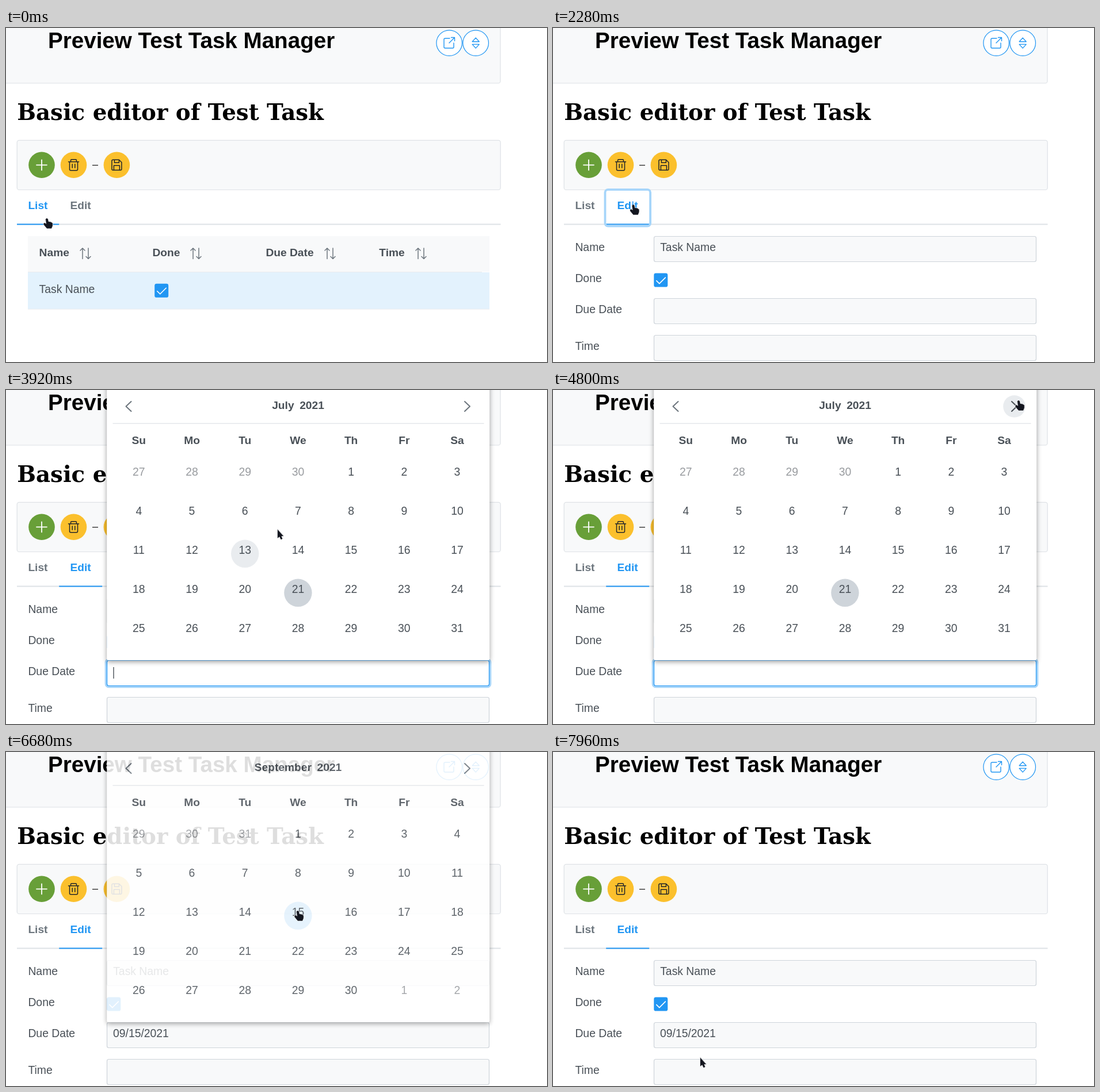
Write an HTML page with a canvas that moves like this. It is 940 px wide and 581 px high and loops after 8 s.

```html
<!DOCTYPE html>
<html lang="en">
<head>
<meta charset="utf-8">
<title>Task editor</title>
<style>
html, body { margin: 0; width: 100%; height: 100%; overflow: hidden; background: #fff; }
canvas { display: block; }
</style>
</head>
<body>
<canvas id="stage" width="940" height="581"></canvas>
<script>
const W = 940, H = 581, LOOP = 8000, TICK = 40;
const stage = document.getElementById('stage').getContext('2d');
const layerCanvas = document.createElement('canvas');
layerCanvas.width = W;
layerCanvas.height = H;
const layer = layerCanvas.getContext('2d');
let c = stage;

const BLUE = '#2196f3', TEXT = '#495057', MUTED = '#6c757d', PANEL = '#f8f9fa',
  LINE = '#dee2e6', BORDER = '#ced4da', HOVER = '#e9ecef', GLOW = '#a6d5fa', INK = '#212529';
const SANS = '"Liberation Sans", Arial, sans-serif';
const BODY = '19.35px ' + SANS, BOLD = 'bold 19.2px ' + SANS;

// Moments of the user's actions, in ms
const OPEN_TAB = 1640, FOCUS = 3320, POPUP = 3360, CARET_OFF = 4640,
  NEXT1 = 5320, NEXT2 = 5480, PICK = 6640, CLOSED = 6920;

const PATH = [
  [720, 71, 331], [1040, 139, 306],
  [2240, 139, 306], [3080, 223, 485],
  [3800, 223, 485], [3920, 472, 243],
  [4160, 473, 243], [4320, 772, 33],
  [4440, 772, 33], [4800, 809, 18],
  [5560, 809, 18], [5720, 690, 78], [5920, 559, 168],
  [6040, 559, 168], [6280, 507, 276],
  [7200, 507, 276], [7960, 256, 532]
];
const FIELDS = [362.5, 470.5, 534.5];
const FIELD_X = 175.5, FIELD_W = 664, FIELD_H = 44;
const NEXT = [801.5, 28.5];
const MONTHS = { 6: 'July', 7: 'August', 8: 'September' };

const clamp = v => Math.max(0, Math.min(1, v));
const ramp = (t, from, len) => clamp((t - from) / len);
const dayX = i => 230.8 + 92.2 * (i % 7);
const dayY = i => 149 + 68 * Math.floor(i / 7);

function text(s, x, y, color = TEXT, font = BODY, align = 'left') {
  c.font = font;
  c.fillStyle = color;
  c.textAlign = align;
  c.fillText(s, x, y);
}

function box(x, y, w, h, r, fill, stroke, lw = 1.2) {
  c.beginPath();
  c.roundRect(x, y, w, h, r);
  paint(fill, stroke, lw);
}

function disc(x, y, r, fill, stroke, lw = 1.2) {
  c.beginPath();
  c.arc(x, y, r, 0, 7);
  paint(fill, stroke, lw);
}

function paint(fill, stroke, lw) {
  if (fill) { c.fillStyle = fill; c.fill(); }
  if (stroke) { c.strokeStyle = stroke; c.lineWidth = lw; c.stroke(); }
}

function icon(d, x, y, stroke, lw = 1.6, fill) {
  c.save();
  c.translate(x, y);
  c.lineCap = c.lineJoin = 'round';
  c.strokeStyle = stroke;
  c.lineWidth = lw;
  const p = new Path2D(d);
  c.stroke(p);
  if (fill) { c.fillStyle = fill; c.fill(p); }
  c.restore();
}

function faded(alpha, draw) {
  if (alpha <= 0) return;
  c.save();
  c.globalAlpha *= alpha;
  draw();
  c.restore();
}

const bar = (x, y, w, h, color) => { c.fillStyle = color; c.fillRect(x, y, w, h); };

const ring = (x, y, w, h, alpha) => faded(alpha, () =>
  box(x - 1.9, y - 1.9, w + 3.8, h + 3.8, 5, null, GLOW, 3.8));

function checkbox(x, y) {
  box(x, y, 24, 24, 3.4, BLUE);
  icon('M4.5 13 L9.5 18 L20 7.5', x, y, '#fff', 1.6);
}

function pointerAt(t) {
  let a = PATH[0];
  for (const b of PATH) {
    if (t < b[0]) {
      const k = ramp(t, a[0], b[0] - a[0] || 1), e = k * k * (3 - 2 * k);
      return [a[1] + (b[1] - a[1]) * e, a[2] + (b[2] - a[2]) * e];
    }
    a = b;
  }
  return [a[1], a[2]];
}

function fieldAt(t, x, y) {
  if (t < OPEN_TAB || x < FIELD_X || x > FIELD_X + FIELD_W) return -1;
  if (t >= POPUP && t < CLOSED && y < 470) return -1;
  return FIELDS.findIndex(f => y >= f && y <= f + FIELD_H);
}

function pointerKind(t, x, y) {
  if (fieldAt(t, x, y) >= 0) return 'beam';
  if (t >= POPUP && t < CLOSED) {
    if (Math.hypot(x - NEXT[0], y - NEXT[1]) < 20) return 'hand';
    for (let i = 0; i < 35; i++)
      if (Math.hypot(x - dayX(i), y - dayY(i) + 4) < 24) return 'hand';
    return 'arrow';
  }
  return x > 19 && x < 167 && y > 283 && y < 343 ? 'hand' : 'arrow';
}

function drawPointer(t, x, y) {
  const kind = pointerKind(t, x, y);
  if (kind === 'beam') {
    const d = 'M-2.5 -6.5 H2.5 M0 -6.5 V6.5 M-2.5 6.5 H2.5';
    icon(d, x, y, '#fff', 2.8);
    icon(d, x, y, '#444', 1.2);
    return;
  }
  const d = kind === 'hand'
    ? 'M-2 1.5 Q0 -1 1.8 1.5 L2.6 6 Q7 5.5 9.8 8.5 L9.8 13 L8 17.5 H0 L-5.4 11 Q-6 8 -3.5 8.3 L-.8 10 Z'
    : 'M0 0 V14.5 L3.2 12 L5.8 17 L8.2 15.8 L6.2 11 H9.8 Z';
  icon(d, x, y, '#fff', 1.6);
  icon(d, x, y, '#14161f', 0.4, '#14161f');
}

function drawHeader() {
  box(-10, -10, 869, 106, 3.6, PANEL, LINE);
  text('Preview Test Task Manager', 73, 35, '#000', 'bold 38.6px ' + SANS);
  for (const x of [770.2, 816.2]) disc(x, 26.1, 22.3, '#fff', BLUE);
  icon('M1 -8 H-7 Q-9 -8 -9 -6 V7 Q-9 9 -7 9 H6 Q8 9 8 7 V0 M3.5 -9.5 H9.5 V-3.5 M9 -9 L0 0',
    770, 26, BLUE, 1.4);
  icon('M-6 -2.3 L0 -9 L6 -2.3 Z M-6 2.3 L0 9 L6 2.3 Z', 816.2, 26.1, BLUE, 1.4);

  text('Basic editor of Test Task', 19.2, 159.5, '#000', 'bold 38.75px "DejaVu Serif", serif');

  box(19.2, 195.3, 840, 86.2, 3.6, PANEL, LINE);
  disc(62, 238.3, 22.8, '#689f38');
  icon('M-9 0 H9 M0 -9 V9', 62, 238.3, '#fff', 1.8);
  disc(117.5, 238.3, 22.8, '#fbc02d');
  icon('M-9 -5.5 H9 M-5 -5.5 V-8 Q-5 -9.5 -3.5 -9.5 H3.5 Q5 -9.5 5 -8 V-5.5 ' +
    'M-7 -5.5 V7.5 Q-7 9.5 -5 9.5 H5 Q7 9.5 7 7.5 V-5.5 M-2.3 -1.5 V5 M2.3 -1.5 V5',
    117.5, 238.3, INK, 1.5);
  bar(150, 238, 10, 1.4, '#333');
  disc(192.4, 238.3, 22.8, '#fbc02d');
  icon('M-6.5 -9 H4 L8.5 -4.5 V7 Q8.5 9 6.5 9 H-6.5 Q-8.5 9 -8.5 7 V-7 Q-8.5 -9 -6.5 -9 Z ' +
    'M-4 -9 V-4 H4 V-8.5 M-5 9 V1 H5 V9', 192.4, 238.3, INK, 1.5);
}

function drawTabs(t, x) {
  const editing = t >= OPEN_TAB;
  const underline = (left, w, color) => bar(left, 340.5, w, 2, color);
  underline(19, 840.5, LINE);
  text('List', 38.4, 315, editing ? MUTED : BLUE, BOLD);
  text('Edit', 111.4, 315, editing ? BLUE : MUTED, BOLD);
  if (!editing) {
    underline(19, 73.2, BLUE);
    if (x > 92) faded(ramp(t, 840, 200), () => underline(92.2, 75, MUTED));
    return;
  }
  underline(92.2, 75, BLUE);
  ring(92.4, 283, 74.8, 59.6, ramp(t, OPEN_TAB - TICK, 200) * (1 - ramp(t, FOCUS - TICK, 200)));
}

function drawTable() {
  bar(38, 362, 802, 62, PANEL);
  bar(38, 424, 789, 1.2, HOVER);
  bar(38, 425, 802, 64, '#e3f2fd');
  bar(38, 488.6, 802, 1, HOVER);
  const heads = [['Name', 138], ['Done', 330], ['Due Date', 563], ['Time', 721]];
  heads.forEach(([label, ix], i) => {
    text(label, 57.6 + 196.9 * i, 397, TEXT, BOLD);
    icon('M-5 9.5 V-9 M-9 -5 L-5 -9 L-1 -5 M5 -9 V9.5 M1 5.5 L5 9.5 L9 5.5', ix, 392, MUTED, 1.5);
  });
  text('Task Name', 57.6, 461);
  checkbox(258.2, 444.8);
}

function drawForm(t, x, y) {
  const hot = fieldAt(t, x, y), focused = t >= FOCUS && t < NEXT1;
  ['Name', 'Done', 'Due Date', 'Time'].forEach((s, i) =>
    text(s, 38.4, [388, 442, 496, 560][i]));
  FIELDS.forEach((fy, i) => {
    const active = focused && i === 1;
    if (active) ring(FIELD_X, fy, FIELD_W, FIELD_H, ramp(t, FOCUS - TICK, 200));
    box(FIELD_X, fy, FIELD_W, FIELD_H, 3, active ? '#fff' : PANEL, active || hot === i ? BLUE : BORDER);
  });
  text('Task Name', 186.2, 388);
  checkbox(175.3, 426.6);
  if (focused && t < CARET_OFF) bar(186.3, 482, 1.4, 20, TEXT);
  if (t >= PICK) text('09/15/2021', 186, 496);
}

function drawDays(t, month) {
  const first = new Date(2021, month, 1).getDay();
  const spot = (day, color, alpha) => {
    const i = first + day - 1;
    faded(alpha, () => disc(dayX(i), dayY(i) - 0.2, 24.2, color));
  };
  if (month === 6) {
    spot(13, HOVER, ramp(t, 3840, 40) * (1 - ramp(t, 3920, 80)));
    spot(21, BORDER, 1);
  }
  if (month === 8) spot(15, t >= PICK ? '#e3f2fd' : HOVER, ramp(t, 6120, 160));
  for (let i = 0; i < 35; i++) {
    const d = new Date(2021, month, 1 - first + i);
    faded(d.getMonth() === month ? 1 : 0.57, () =>
      text(d.getDate(), dayX(i), dayY(i), TEXT, BODY, 'center'));
  }
}

function drawCalendar(t) {
  const month = t < NEXT1 ? 6 : t < NEXT2 ? 7 : 8;
  c.save();
  c.shadowColor = 'rgba(0,0,0,.4)';
  c.shadowBlur = 8;
  c.shadowOffsetY = 2.5;
  box(175.2, -20, 665, 490.2, 3, '#fff');
  c.restore();
  bar(185.5, 57.6, 645, 1.2, LINE);

  icon('M4.5 -8.5 L-4.5 0 L4.5 8.5', 213, 28.5, MUTED, 2);
  if (t >= NEXT1 && t < PICK) disc(...NEXT, 21, null, GLOW, 3.8);
  const warm = ramp(t, 4600, 200) * (1 - ramp(t, 5680, 240));
  faded(warm, () => disc(...NEXT, 19.3, HOVER));
  icon('M-4.5 -8.5 L4.5 0 L-4.5 8.5', ...NEXT, warm > 0.3 ? '#4a4f55' : MUTED, 2);

  c.font = BOLD;
  const name = MONTHS[month], nameW = c.measureText(name).width, gap = 9.6;
  const left = 507.5 - (nameW + gap + c.measureText('2021').width) / 2;
  text(name, left, 33, TEXT, BOLD);
  text('2021', left + nameW + gap, 33, TEXT, BOLD);
  ['Su', 'Mo', 'Tu', 'We', 'Th', 'Fr', 'Sa'].forEach((s, i) =>
    text(s, dayX(i), 94, TEXT, BOLD, 'center'));
  drawDays(t, month);
}

function drawPopup(t) {
  if (t < POPUP || t >= CLOSED) return;
  const k = 1 - (1 - ramp(t, POPUP - TICK, 120)) ** 2;
  const alpha = t < 6680 ? k : t < 6760 ? 0.87 : 0.08;
  const scale = 0.8 + 0.2 * k;
  layer.clearRect(0, 0, W, H);
  c = layer;
  drawCalendar(t);
  c = stage;
  faded(alpha, () => c.drawImage(layerCanvas, 0, 470 * (1 - scale), W, H * scale));
}

function render(t) {
  const [x, y] = pointerAt(t);
  bar(0, 0, W, H, '#fff');
  drawHeader();
  drawTabs(t, x);
  if (t < OPEN_TAB) drawTable();
  else drawForm(t, x, y);
  drawPopup(t);
  drawPointer(t, x, y);
}

const start = performance.now();
function loop() {
  const t = (performance.now() - start) % LOOP;
  render(Math.floor(t / TICK) * TICK);
  requestAnimationFrame(loop);
}
loop();
</script>
</body>
</html>
```
